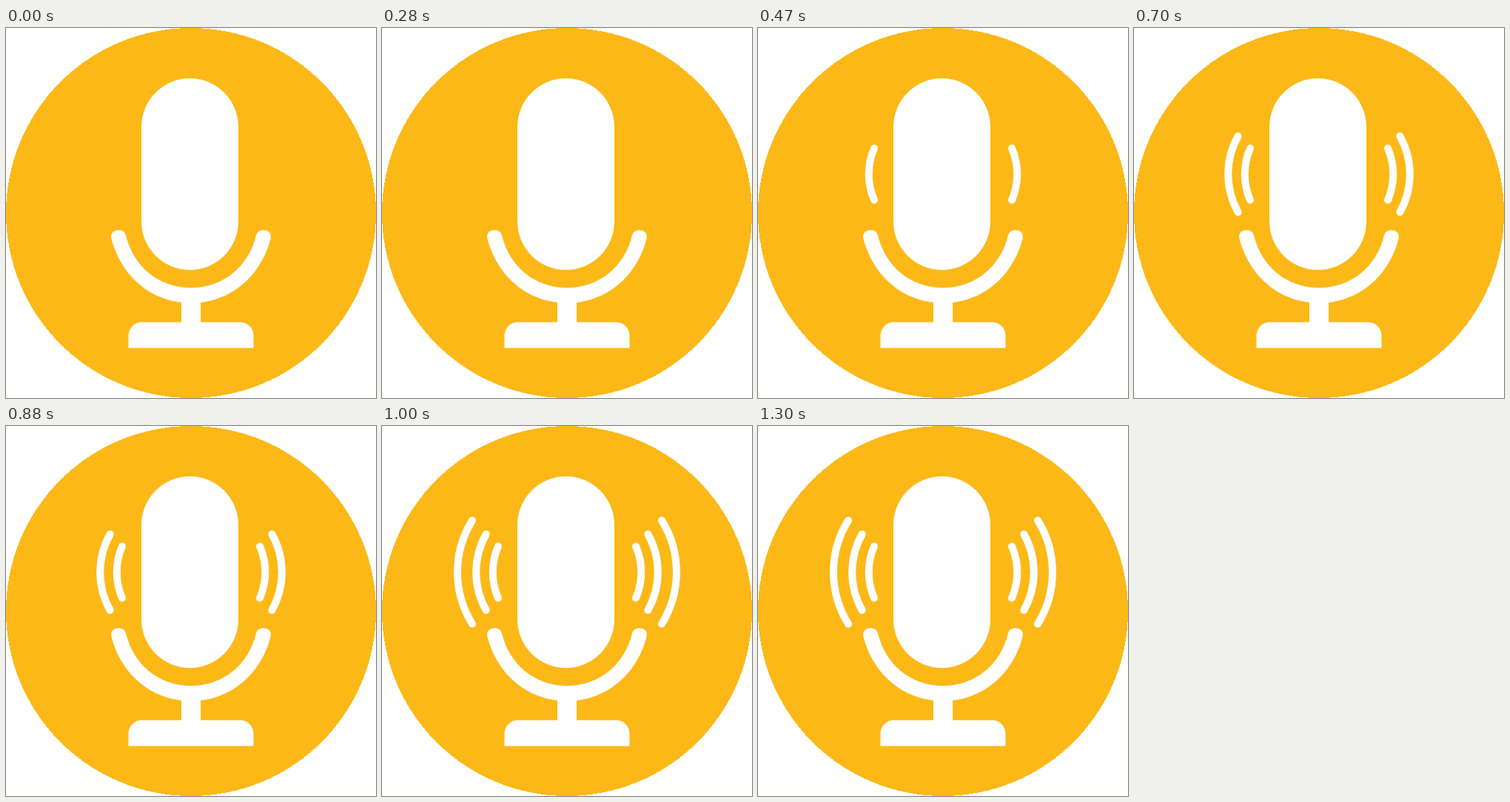
An HTML page for the animation above (1500 ms loop, 500x500 px).

```html
<!DOCTYPE html>
<html lang="en">
<head>
<meta charset="utf-8">
<title>Microphone</title>
<style>
  html, body { margin: 0; width: 100%; height: 100%; overflow: hidden; background: #fff; }
  svg { display: block; width: 100%; height: 100%; }
  .disc { fill: #fcb817; shape-rendering: crispEdges; }
  .mic { fill: #fff; }
  .wave { fill: none; stroke: #fff; stroke-width: 10; stroke-linecap: round; }
  .near { animation: near 1500ms step-end infinite; }
  .middle { animation: middle 1500ms step-end infinite; }
  .far { animation: far 1500ms step-end infinite; }
  @keyframes near { 0% { opacity: 0; } 31.3333% { opacity: 1; } 100% { opacity: 1; } }
  @keyframes middle { 0% { opacity: 0; } 46.6667% { opacity: 1; } 100% { opacity: 1; } }
  @keyframes far { 0% { opacity: 0; } 66.6667% { opacity: 1; } 100% { opacity: 1; } }
</style>
</head>
<body>
<svg viewBox="0 0 500 500">
  <circle class="disc" cx="250" cy="250" r="250"/>
  <g class="mic">
    <rect x="183" y="68" width="131" height="259" rx="65.5"/>
    <path d="M142 283Q142 273 152 273Q160 273 162 280C172 322 206 351 250 351C294 351 328 322 338 280Q340 273 348 273Q358 273 358 283C347 329 312 365 263 371V397.5H316.5A18 18 0 0 1 334.5 415.5V432.5H165.5V415.5A18 18 0 0 1 183.5 397.5H237V371C188 365 153 329 142 283Z"/>
  </g>
  <!-- each wave is a mirrored pair of arcs -->
  <path class="wave near" d="M157 162.5A87.8 87.8 0 0 0 157 232.5M343 162.5A87.8 87.8 0 0 1 343 232.5"/>
  <path class="wave middle" d="M140.7 146A105 105 0 0 0 140.7 249M359.3 146A105 105 0 0 1 359.3 249"/>
  <path class="wave far" d="M122 127.5A132.5 132.5 0 0 0 122 267.5M378 127.5A132.5 132.5 0 0 1 378 267.5"/>
</svg>
</body>
</html>
```
